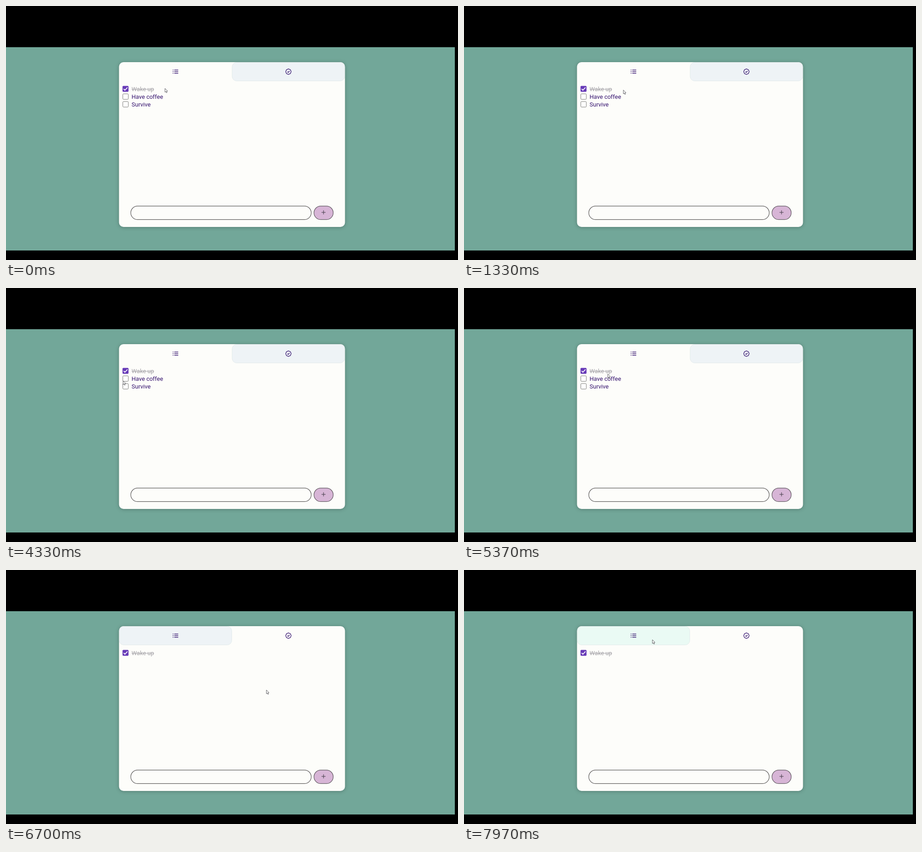
These frames come from a looping animation (998 px wide and 561 px high, 8000 ms). An HTML page with a canvas:

```html
<!DOCTYPE html>
<html lang="en">
<head>
<meta charset="utf-8">
<title>To-do list</title>
<style>
html, body { margin: 0; width: 100%; height: 100%; overflow: hidden; background: #000; }
canvas { display: block; width: 998px; height: 561px; }
</style>
</head>
<body>
<canvas id="stage" width="998" height="561"></canvas>
<script>
const ctx = document.getElementById('stage').getContext('2d');
const LOOP = 8000;
const CLICK = 5720;
const INK = '#35136f';
const MUTED = '#a3a1a6';
const CARD = [253, 253, 250];
const GREY = [243, 243, 239];
const IDLE = [238, 243, 246];
const HOVER = [234, 250, 244];

// Eased pointer moves; it rests in between
const moves = [
  { from: 0, to: 1630, x: 352, y: 186 },
  { from: 1700, to: 2330, x: 376, y: 214 },
  { from: 3799, to: 3800, x: 308, y: 190 },
  { from: 3950, to: 4330, x: 258.5, y: 205 },
  { from: 4820, to: 5130, x: 285, y: 195 },
  { from: 5290, to: 5700, x: 605, y: 145 },
  { from: 6100, to: 6690, x: 575, y: 265 },
  { from: 6960, to: 7770, x: 416, y: 154 }
];

const clamp = v => Math.max(0, Math.min(1, v));
const fade = (t, start, time) => clamp((t - start) / time);
const ease = k => k * k * (3 - 2 * k);
const lerp = (a, b, k) => a + (b - a) * k;
const mix = (a, b, k) => a.map((v, i) => lerp(v, b[i], k));
const rgb = c => `rgb(${c.map(Math.round).join(',')})`;

function pointerAt(t) {
  let x = 351, y = 182;
  for (const m of moves) {
    const k = ease(fade(t, m.from, m.to - m.from));
    x = lerp(x, m.x, k);
    y = lerp(y, m.y, k);
  }
  return [x, y];
}

function box(x, y, w, h, r, fill, stroke, width = 1) {
  ctx.beginPath();
  ctx.roundRect(x, y, w, h, r);
  if (fill) { ctx.fillStyle = fill; ctx.fill(); }
  if (stroke) { ctx.strokeStyle = stroke; ctx.lineWidth = width; ctx.stroke(); }
}

function line(points, color, width) {
  ctx.beginPath();
  for (const [x, y] of points) ctx.lineTo(x, y);
  ctx.strokeStyle = color;
  ctx.lineWidth = width;
  ctx.stroke();
}

function backdrop() {
  ctx.fillStyle = '#000';
  ctx.fillRect(0, 0, 998, 561);
  ctx.fillStyle = '#72a799';
  ctx.fillRect(0, 91, 991, 449);
  ctx.save();
  ctx.shadowColor = 'rgba(0,0,0,.25)';
  ctx.shadowBlur = 9;
  ctx.shadowOffsetY = 1;
  box(249.5, 124, 499, 364, 10, rgb(CARD));
  ctx.restore();
}

function tab(x, color, shown) {
  const edge = mix(CARD, [222, 231, 232], shown);
  box(x, 124.5, 248.5, 41, 10, rgb(color), rgb(edge), 0.8);
}

function tabs(t) {
  const settle = fade(t, CLICK + 150, 300);
  const leftOn = fade(t, CLICK, 130);
  const rightOn = 1 - leftOn;
  ctx.save();
  ctx.beginPath();
  ctx.roundRect(249.5, 124, 499, 364, 10);
  ctx.clip();
  if (leftOn) {
    const base = mix(mix(GREY, IDLE, settle), HOVER, fade(t, 7650, 200));
    tab(250, mix(CARD, base, leftOn), settle);
  }
  if (rightOn) {
    const base = mix(IDLE, HOVER, fade(t, 5560, 160));
    tab(499.3, mix(CARD, base, rightOn), rightOn);
  }
  ctx.restore();
}

function listIcon() {
  for (const y of [141.4, 145, 148.6]) {
    line([[368, y], [369.7, y]], INK, 1.4);
    line([[371.5, y], [380.3, y]], INK, 1.4);
  }
}

function badgeIcon() {
  const points = Array.from({ length: 97 }, (_, i) => {
    const a = i / 96 * Math.PI * 2;
    const r = 5.75 + 0.25 * Math.cos(a * 8);
    return [623.6 + r * Math.cos(a), 145 + r * Math.sin(a)];
  });
  line(points, INK, 1.3);
  line([[621.3, 145.2], [622.9, 146.8], [626, 143.5]], INK, 1.3);
}

function task(label, y, done) {
  if (done) {
    box(257.3, y - 6.5, 13.2, 13, 1.8, '#673ab7');
    line([[259.8, y + 0.2], [262.6, y + 3], [268.2, y - 3.2]], '#fff', 1.8);
  } else {
    box(257.9, y - 6, 12.2, 12.2, 1.8, '#fefefd', '#797977');
  }
  ctx.font = '13px Roboto, sans-serif';
  ctx.fillStyle = done ? MUTED : INK;
  ctx.fillText(label, 277.3, y + 5);
  if (done) {
    const w = ctx.measureText(label).width;
    line([[277.3, y + 1], [277.3 + w, y + 1]], MUTED, 1);
  }
}

function entryBar() {
  box(275.5, 441.9, 398.4, 29.8, 14.9, rgb(CARD), '#5b5959', 1.2);
  box(680, 441.9, 42.5, 29.8, 14.9, '#d7b5d6', '#5f575f', 1.2);
  line([[696.6, 455.8], [705.6, 455.8]], '#443c48', 1.1);
  line([[701.1, 451.3], [701.1, 460.3]], '#443c48', 1.1);
}

function pointer([x, y]) {
  ctx.save();
  ctx.translate(x, y);
  const arrow = new Path2D('M0 0V8.4L1.9 6.7 3.3 9.7 4.7 9 3.3 6.2 5.8 6Z');
  ctx.fillStyle = '#fff';
  ctx.fill(arrow);
  ctx.strokeStyle = '#3c3c40';
  ctx.lineWidth = 0.8;
  ctx.stroke(arrow);
  ctx.restore();
}

function draw(t) {
  backdrop();
  tabs(t);
  listIcon();
  badgeIcon();
  task('Wake up', 183, true);
  if (t < CLICK) {
    task('Have coffee', 200, false);
    task('Survive', 217, false);
  }
  entryBar();
  pointer(pointerAt(t));
}

ctx.lineJoin = 'round';
const begin = performance.now();
function tick() {
  draw((performance.now() - begin) % LOOP);
  requestAnimationFrame(tick);
}
tick();
</script>
</body>
</html>
```
